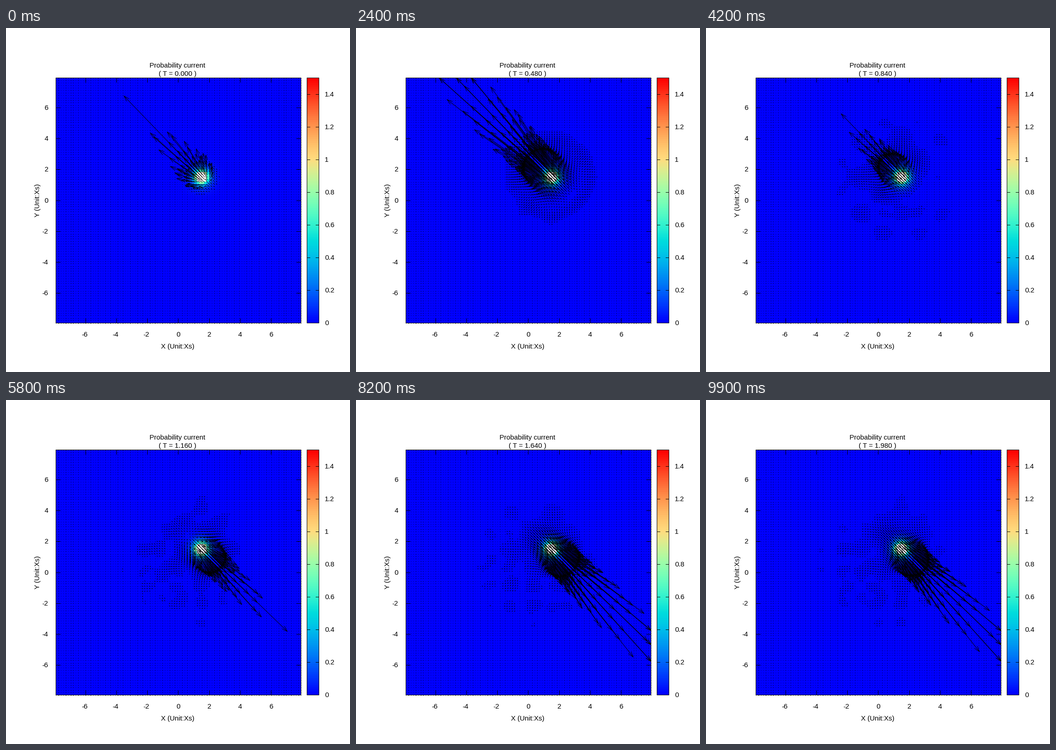
A matplotlib script for the animation above (10000 ms loop, 748 by 748 pixels).

```python
import numpy as np
import matplotlib.pyplot as plt
from matplotlib.animation import FuncAnimation
from matplotlib.collections import LineCollection

plt.rcParams["font.family"] = "Liberation Sans"

SIZE, DPI = 748, 100
LEFT, RIGHT, TOP, BOTTOM = 108, 641, 108, 641
CX = CY = 374.5
UNIT = (RIGHT - LEFT) / 15.84      # pixels per Xs
N = 100                            # grid points per side
PX = 72 / DPI                      # one pixel in points
FRAMES, STEP = 100, 0.02

fig = plt.figure(figsize=(SIZE / DPI, SIZE / DPI), dpi=DPI, facecolor="white")
ax = fig.add_axes([0, 0, 1, 1])
ax.axis("off")


def palette(v):
    """Blue - cyan - green - orange - red for v in 0..1."""
    rgb = [3 * v - 1, np.sin(np.pi * v), np.cos(np.pi * v / 2)]
    return np.clip(np.stack(rgb, axis=-1), 0, 1)


def label(x, y, s, ha="center", **kw):
    return ax.text(x, y, s, ha=ha, fontsize=15 * PX, color="black", zorder=6, **kw)


def line(xs, ys):
    ax.plot(xs, ys, color="black", lw=PX, zorder=5, solid_capstyle="butt")


def box(x0, x1):
    line([x0, x1, x1, x0, x0], [TOP, TOP, BOTTOM, BOTTOM, TOP])


# Grid on pixel centres, relative to the packet centre; u, v point right and up
axis = np.linspace(LEFT, RIGHT, N) + 0.5
gx, gy = (a.ravel() for a in np.meshgrid(axis, axis))
u = gx - 0.5 - (CX + 1.5 * UNIT)
v = (CY - 1.5 * UNIT) - (gy - 0.5)
r = np.hypot(u, v) + 1e-6
ru, rv = u / r, v / r
along = (v - u) / np.sqrt(2)       # towards the upper left
across = (u + v) / np.sqrt(2)
facing = along / r

# Density: cells with a corner above the range stay empty
rho = (5.5 * np.exp(-r / 6.5)).reshape(N, N)
corners = np.stack([rho[:-1, :-1], rho[1:, :-1], rho[:-1, 1:], rho[1:, 1:]])
cells = palette(corners.mean(axis=0) / 1.5)
cells[corners.max(axis=0) > 1.5] = 1
ax.imshow(cells, extent=(LEFT + 0.5, RIGHT + 0.5, BOTTOM + 0.5, TOP + 0.5),
          aspect="auto", interpolation="nearest", zorder=1)
bar = palette(np.linspace(1, 0, 128))[:, None, :]
ax.imshow(bar, extent=(654, 680, BOTTOM, TOP), aspect="auto",
          interpolation="nearest", zorder=1)
ax.set_xlim(0, SIZE)
ax.set_ylim(SIZE, 0)

# Frames, ticks and labels
box(LEFT, RIGHT)
box(654, 680)
for k in range(-6, 7, 2):
    x, y = CX + k * UNIT, CY - k * UNIT
    line([x, x], [BOTTOM, BOTTOM - 10])
    line([x, x], [TOP, TOP + 10])
    line([LEFT, LEFT + 10], [y, y])
    line([RIGHT, RIGHT - 10], [y, y])
    label(x - (2 if k < 0 else 0), 671, str(k))
    label(92, y + 5, str(k), ha="right")
for k in range(8):
    y = BOTTOM - (BOTTOM - TOP) * k * 0.2 / 1.5
    line([654, 661], [y, y])
    line([673, 680], [y, y])
    label(693, y + 5, f"{k * 0.2:.2g}", ha="left")
label(373, 86, "Probability current")
clock = label(373, 104, "")
label(373, 697, "X (Unit:Xs)")
label(69, 375, "Y (Unit:Xs)", rotation=90, va="center")

# Vanishing vectors show as dots
dots = np.stack([np.stack([gx - 0.7, gy], -1), np.stack([gx + 0.7, gy], -1)], 1)
ax.add_collection(LineCollection(dots, colors=[(0, 0, 0, 0.75)], linewidths=PX,
                                 capstyle="butt", zorder=2), autolim=False)
clip = plt.Rectangle((LEFT, TOP), RIGHT - LEFT + 1, BOTTOM - TOP + 1,
                     transform=ax.transData)
shafts = LineCollection([], colors="black", linewidths=0.9 * PX, zorder=3)
heads = LineCollection([], colors="black", linewidths=0.9 * PX, zorder=3)
for c in (shafts, heads):
    ax.add_collection(c, autolim=False)
    c.set_clip_path(clip)

DRIVE_T = [0, .04, .12, .26, .48, .68, .84, 1.0, 1.16, 1.32, 1.64, 2.0]
DRIVE = [280, 350, 470, 560, 520, 370, 190, 10, -270, -420, -540, -510]
TAIL_T = [0, .25, .84, 1.3, 1.5, 2.0]
TAIL = [0, .6, 1, .6, -.5, -.6]


def current(t):
    """Vector field in pixels: jet, outgoing ring, side flow and ripples."""
    grow = min(1, t / 0.2)
    amp = np.interp(t, DRIVE_T, DRIVE)
    shift = 8 * grow * np.clip(amp / 150, -1, 1)
    d = np.hypot((along - shift) / (1 + 0.25 * grow), across)
    env = np.exp(-d / (7 + 2.5 * grow)) + 0.04 * grow * np.exp(-d / 18)
    ja = amp * env
    jc = abs(amp) * env * 0.4 * np.tanh(across / 22)

    ring = 18 * np.exp(-4 * t) * (1 - 0.4 * facing)
    ring = ring * np.exp(-((r - 15 - 130 * t) / (7 + 22 * t)) ** 2)
    side = 19 * np.exp(-r / 36) * (0.5 + 0.5 * facing)
    side = side * (1 - np.exp(-(r / 12) ** 2)) * np.interp(t, TAIL_T, TAIL)
    radial = ring + side

    # Weak ripples drift towards the lower left
    age = min(t, 1.3)
    spread = np.hypot(along, across + 40 * age) / (40 + 85 * age)
    ripple = 2.4 * grow * np.exp(-spread ** 2)
    wu = ripple * np.sin(u / 19 + 4 * t) * np.cos(v / 13)
    wv = ripple * np.sin(v / 17 - 4 * t) * np.cos(u / 14)

    ju = (jc - ja) / np.sqrt(2) + radial * ru + wu
    jv = (jc + ja) / np.sqrt(2) + radial * rv + wv
    return ju, -jv


def reach_edge(p, d, lo, hi):
    """Fraction of step d from p that stays inside lo..hi."""
    room = np.where(d > 0, hi - p, p - lo)
    return np.minimum(1, room / np.maximum(np.abs(d), 1e-9))


def update(i):
    t = i * STEP
    dx, dy = current(t)
    keep = np.hypot(dx, dy) > 1.2
    x, y, dx, dy = gx[keep], gy[keep], dx[keep], dy[keep]
    f = np.minimum(reach_edge(x, dx, LEFT + 0.5, RIGHT + 0.5),
                   reach_edge(y, dy, TOP + 0.5, BOTTOM + 0.5))
    tx, ty = x + dx * f, y + dy * f
    size = np.clip(0.3 * np.hypot(dx, dy), 1.2, 13)
    back = np.arctan2(-dy, -dx)

    def barb(turn):
        a = back + np.radians(turn)
        return np.stack([tx + size * np.cos(a), ty + size * np.sin(a)], -1)

    tip = np.stack([tx, ty], -1)
    shafts.set_segments(np.stack([np.stack([x, y], -1), tip], 1))
    heads.set_segments(np.stack([barb(17), tip, barb(-17)], 1))
    clock.set_text(f"( T = {t:.3f} )")
    return shafts, heads, clock


anim = FuncAnimation(fig, update, frames=FRAMES, interval=100,
                     repeat=True, repeat_delay=0, blit=False)
plt.show()
```
